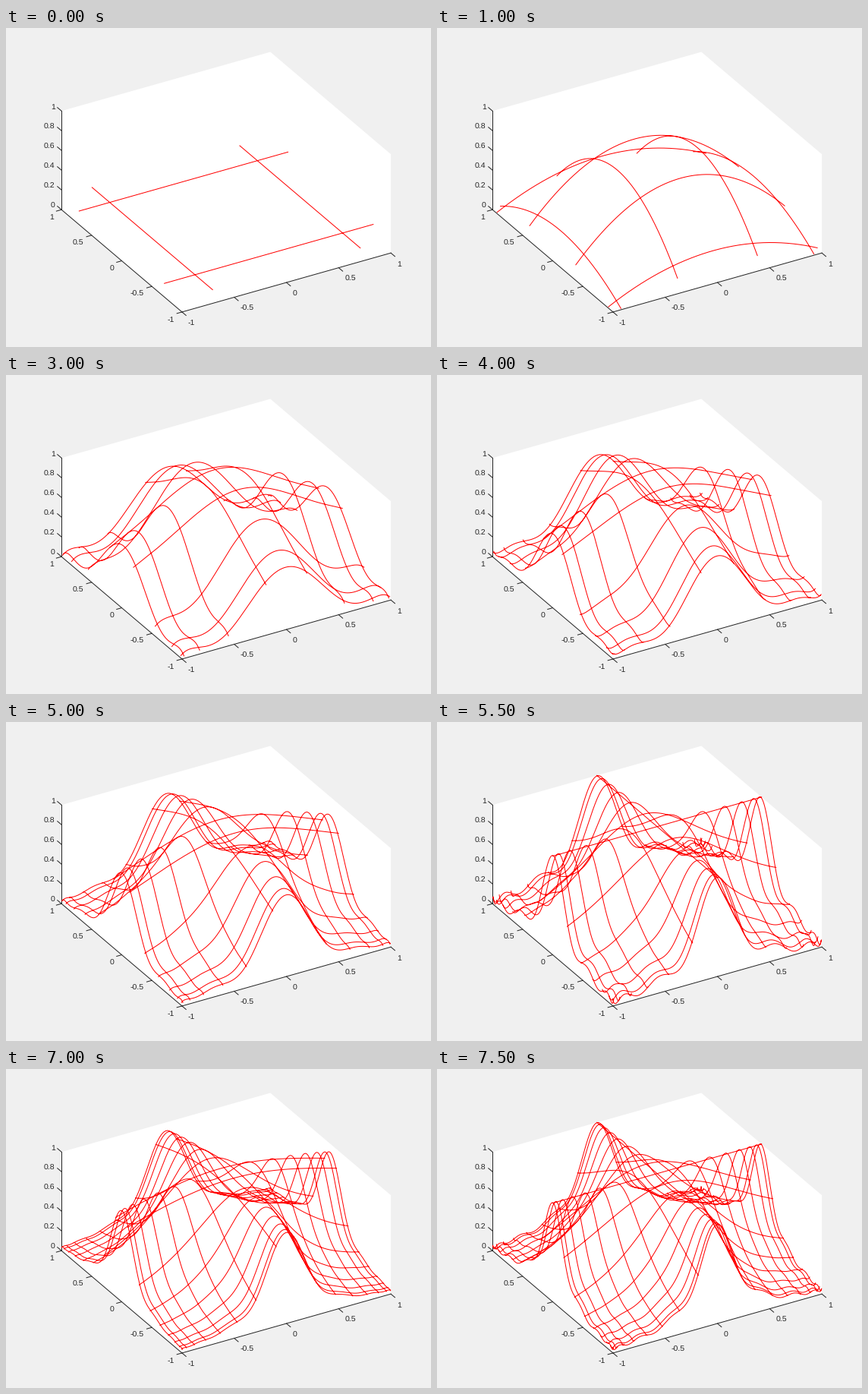
Animation, 560 px wide and 420 px high, one loop 8000 ms. Source, as a matplotlib script:

```python
import numpy as np
from numpy.polynomial import chebyshev as cheb
import matplotlib.pyplot as plt
from matplotlib.animation import FuncAnimation

W, H, DPI = 560, 420, 80
PX = 72 / DPI                      # one pixel in points
FRAMES, INTERVAL = 16, 500
INK = "#262626"
plt.rcParams["text.hinting"] = "none"

# Orthographic projection: screen position of (-1, -1, 0) and the unit axes
ORIGIN = np.array([231.4, 373.4])
EX = np.array([137.6, -38.85])
EY = np.array([-79.4, -67.35])
EZ = np.array([0, -130])


def project(x, y, z):
    x, y, z = (np.asarray(v, float)[..., None] for v in (x, y, z))
    return ORIGIN + (x + 1) * EX + (y + 1) * EY + z * EZ


def runge(x, y):
    return 1 / (1 + 25 * x**2 * y**2)


fig = plt.figure(figsize=(W / DPI, H / DPI), dpi=DPI, facecolor="#f0f0f0")
ax = fig.add_axes([0, 0, 1, 1])
ax.set_xlim(-0.5, W - 0.5)
ax.set_ylim(H - 0.5, -0.5)
ax.axis("off")


def stroke(points, **kw):
    points = np.asarray(points)
    return ax.plot(points[:, 0], points[:, 1], lw=PX, **kw)[0]


def ruler(ends, ticks, direction, shift, ha):
    """Axis line with outward ticks and labels."""
    stroke(ends, color=INK, zorder=2)
    step = 7 * direction / np.hypot(*direction)
    for label, pos in ticks:
        stroke([pos, pos + step], color=INK, zorder=2)
        ax.text(pos[0] + shift[0], pos[1] + shift[1] + 3.6, label, ha=ha,
                va="baseline", color=INK, fontsize=10.5 * PX,
                family="Liberation Sans")


# White back walls and floor
outline = [(-1, 1, 0), (-1, 1, 1), (1, 1, 1), (1, -1, 1), (1, -1, 0), (-1, -1, 0)]
ax.fill(*project(*np.transpose(outline)).T, color="white", lw=0, zorder=1)

sides = [-1, -0.5, 0, 0.5, 1]
ruler(project([-1, 1], [-1, -1], [0, 0]),
      [(f"{v:g}", project(v, -1, 0)) for v in sides], -EY, (8, 14), "left")
ruler(project([-1, -1], [-1, 1], [0, 0]),
      [(f"{v:g}", project(-1, v, 0)) for v in sides], -EX, (-10.5, 9.5), "right")
ruler(project([-1, -1], [1, 1], [0, 1]),
      [(f"{v:g}", project(-1, 1, v)) for v in np.arange(6) / 5], EY, (-8.5, -6), "right")

t = np.linspace(-1, 1, 801)
mesh = stroke([(np.nan, np.nan)], color="red", zorder=3)


def draw(i):
    """Interpolate along the lines through an n-by-n Chebyshev grid."""
    n = i + 2
    gap = np.full((1, 2), np.nan)
    parts = []
    for node in cheb.chebpts1(n):
        z = cheb.chebval(t, cheb.chebinterpolate(runge, n - 1, args=(node,)))
        z[(z < 0) | (z > 1 + 1e-6)] = np.nan   # clip to the axes box
        fixed = np.full_like(t, node)
        parts += [project(t, fixed, z), gap, project(fixed, t, z), gap]
    mesh.set_data(*np.vstack(parts).T)
    return mesh,


anim = FuncAnimation(fig, draw, frames=FRAMES, interval=INTERVAL,
                     repeat=True, repeat_delay=0)
plt.show()
```
